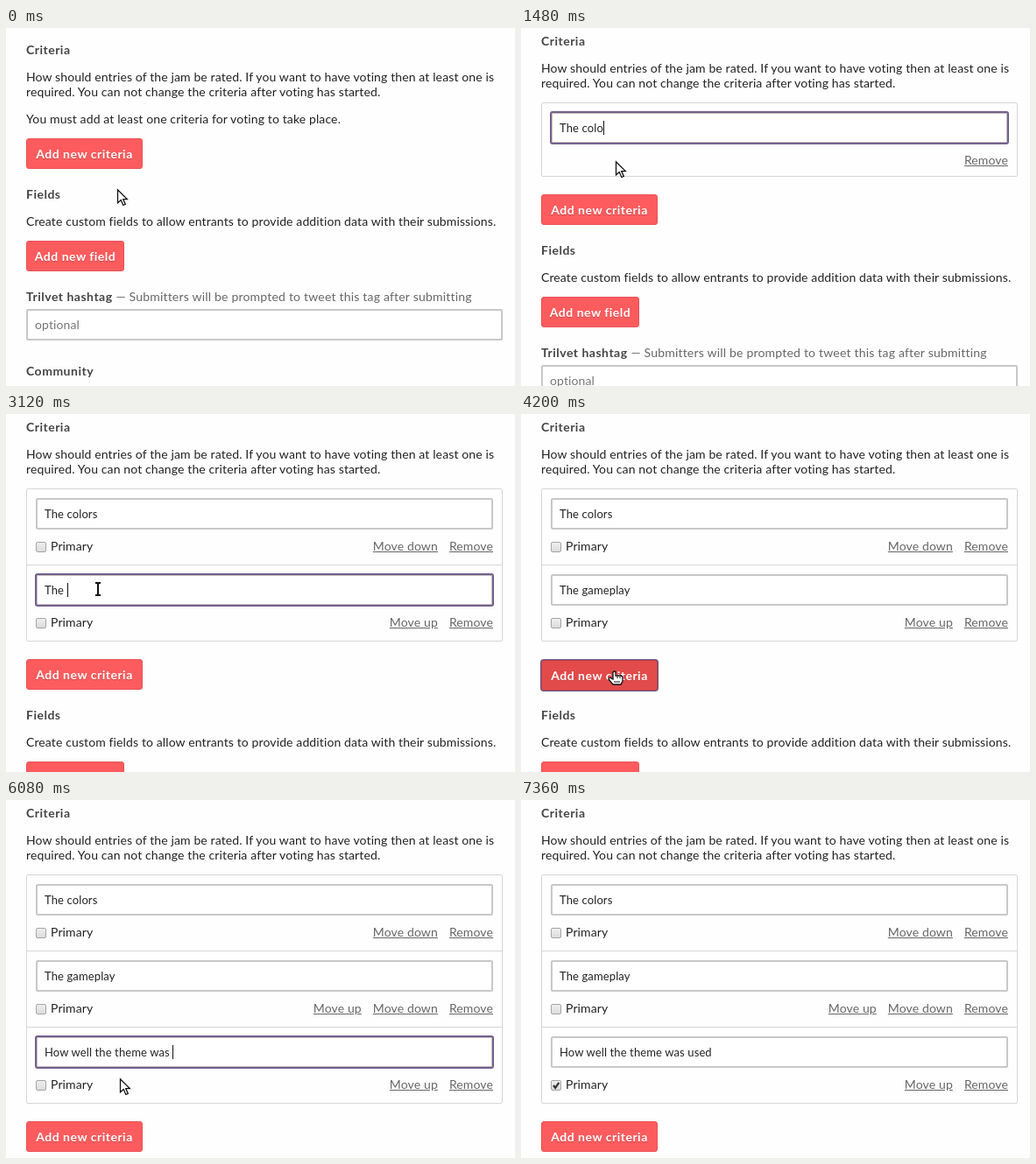
These frames come from a looping animation (581x409 px, 8300 ms). An HTML page:

```html
<!DOCTYPE html>
<html lang="en">
<head>
<meta charset="utf-8">
<title>Jam criteria form</title>
<style>
html, body { margin: 0; width: 100%; height: 100%; overflow: hidden; background: #fefefe; }
#stage { position: relative; width: 581px; height: 409px; overflow: hidden; font: 14px/17px Lato, sans-serif; letter-spacing: .12px; color: #222; }
#stage > * { position: absolute; box-sizing: border-box; white-space: pre; }
b, .button { letter-spacing: .5px; }
b { color: #444; }
.hint { color: #666; letter-spacing: .2px; }
.button { left: 23px; height: 35px; border: 1px solid #e95356; border-radius: 3px; background: #fc5c5e; color: #fff;
  font-weight: bold; line-height: 34px; text-align: center; text-shadow: 0 1px 0 #cf4647; }
.pressed { background: #e34a4a !important; border-color: #b8434c; box-shadow: 0 0 0 1px #67598c; }
.list { left: 23px; top: 85px; width: 544px; border: 1px solid #d6d6d6; border-radius: 2px; }
.line { left: 24px; width: 542px; height: 1px; background: #d6d6d6; }
.input { height: 36px; border: 2px solid #c8c8c8; border-radius: 2px; padding-left: 8px; line-height: 32px; background: #fff; }
.small { font-size: 13px; }
.focus { border-color: #c2bcb8; outline: 2px solid #75608f; outline-offset: -1px; }
.empty { color: #757575; }
.caret { display: inline-block; width: 1px; height: 16px; margin-right: -1px; background: #111; vertical-align: -3px; }
.links { right: 25px; display: flex; gap: 13px; color: #666; text-decoration: underline; }
.check { left: 34px; width: 12px; height: 12px; border: 1px solid #a5a5a5; border-radius: 2px; background: linear-gradient(#eee, #dcdcdc); }
svg { overflow: visible; }
</style>
</head>
<body>
<div id="stage"></div>
<script>
const LOOP = 8300;
const stage = document.getElementById('stage');

// added/blurred: when the row appears and loses focus; typing: [chars, start, end]
const rows = [
  { text: 'The colors', added: 240, blurred: 2060, caretOff: [700, 1000], typing: [[8, 1060, 1480], [2, 1640, 1700]] },
  { text: 'The gameplay', added: 2120, blurred: 4140, caretOff: [2500, 2920], typing: [[12, 2950, 3560]] },
  { text: 'How well the theme was used', added: 4260, blurred: 6940, caretOff: [4600, 4980], typing: [[18, 5020, 5800], [9, 5860, 6300]] }
];
const presses = [[180, 240], [2060, 2120], [4140, 4260]];
const hovers = [[100, 240], [2000, 2120], [4040, 4260]];
const checkedAt = 7000;

// time, x, y, shape until the next key
const pointer = [
  [0, 127, 184, 'arrow'], [20, 127, 184, 'arrow'], [100, 118, 160, 'hand'], [180, 107, 142, 'hand'],
  [240, 107, 142, 'arrow'], [540, 107, 142, 'arrow'], [760, 108, 152, 'arrow'],
  [1920, 108, 152, 'arrow'], [2000, 108, 191, 'hand'], [2060, 108, 210, 'hand'], [2120, 108, 212, 'arrow'],
  [2200, 107, 218, 'arrow'], [2320, 107, 222, 'arrow'], [2420, 106, 214, 'beam'], [2560, 105, 200, 'beam'],
  [3900, 105, 200, 'beam'], [3950, 105, 220, 'arrow'], [4040, 106, 281, 'hand'], [4120, 107, 294, 'hand'],
  [4260, 107, 294, 'beam'], [4360, 112, 306, 'arrow'], [4620, 130, 318, 'arrow'],
  [6620, 130, 318, 'arrow'], [6900, 38, 326, 'arrow'], [7200, 38, 326, 'arrow'], [7360, 62, 412, 'none'], [LOOP, 62, 412, 'none']
];
const shapes = {
  none: '',
  arrow: '<path d="M.5 .8V15.8L4.2 12.6L6.8 18.5L9.3 17.4L6.7 11.6H11.3Z" fill="#fff" stroke="#111" stroke-width="1.3"/>',
  beam: '<path d="M-3-7H3M-3 7H3M0-7V7" fill="none" stroke="#fff" stroke-width="4"/><path d="M-3-7H3M-3 7H3M0-7V7" fill="none" stroke="#111" stroke-width="2"/>',
  hand: '<path d="M-2 1Q0-1 1 1V5H7Q9 5 9 8V11L7 15H-2L-7 9Q-6 6-4 8L-2 9Z" fill="#fff" stroke="#111" stroke-width="1.3"/><path d="M3 6V8M6 6V8M-1 12H6" stroke="#111"/>'
};

const within = (t, [from, to]) => t >= from && t < to;
const clamp = v => Math.max(0, Math.min(1, v));
const box = (cls, style, html = '') => `<div class="${cls}" style="${style}">${html}</div>`;
const text = (y, html, x = 23) => box('', `left:${x}px;top:${y - 9}px`, html);

function typedCount(t, typing) {
  return typing.reduce((sum, [n, from, to]) =>
    sum + (t < from ? 0 : Math.min(n, 1 + Math.floor((t - from) / (to - from) * (n - 1) + 1e-6))), 0);
}

function hoverLevel(t) {
  return Math.max(...hovers.map(([from, to]) => Math.min(clamp((t - from) / 100), clamp(1 - (t - to) / 160))));
}

function button(y, label, width, style = '', cls = '') {
  return box('button ' + cls, `top:${y}px;width:${width}px;${style}`, label);
}

function rowView(row, i, count, t) {
  const y = 85 + 87 * i;
  const typed = row.text.slice(0, typedCount(t, row.typing));
  const focused = t < row.blurred;
  const caret = focused && !within(t, row.caretOff) ? '<i class="caret"></i>' : '';
  const content = typed ? typed + caret : `${caret}<span class="empty">How should the entry be judged?</span>`;
  const links = [i > 0 && 'Move up', i < count - 1 && 'Move down', 'Remove'].filter(Boolean);
  const tick = i === 2 && t >= checkedAt
    ? '<svg width="10" height="10" style="display:block"><path d="M2 5L4.2 7.8L8.3 1.8" fill="none" stroke="#333" stroke-width="2.2"/></svg>' : '';
  return (i ? box('line', `top:${y}px`) : '')
    + box('input small' + (focused ? ' focus' : ''), `left:34px;top:${y + 11}px;width:522px`, content)
    + (count > 1 ? box('check', `top:${y + 61}px`, tick) + text(y + 66, 'Primary', 51) : '')
    + box('links', `top:${y + 57}px`, links.map(link => `<span>${link}</span>`).join(''));
}

function pointerView(t) {
  const i = pointer.findIndex((key, k) => t < pointer[k + 1][0]);
  const [t0, x0, y0, shape] = pointer[i], [t1, x1, y1] = pointer[i + 1];
  const p = (t - t0) / (t1 - t0);
  const x = x0 + (x1 - x0) * p, y = y0 + (y1 - y0) * p;
  return `<svg width="1" height="1" style="left:${Math.round(x)}px;top:${Math.round(y)}px">${shapes[shape]}</svg>`;
}

function view(t) {
  const shown = rows.filter(row => t >= row.added);
  const count = shown.length;
  const top = count ? 15 : 25;
  const listEnd = count === 1 ? 170 : 86 + 87 * count;
  const y = count ? listEnd + 20 : 126;
  const pressed = presses.some(span => within(t, span));
  const lift = hoverLevel(t) * 24;
  const fill = `background:rgb(${252 + lift / 8},${92 + lift},${94 + lift})`;
  return text(top, '<b>Criteria</b>')
    + text(top + 31, 'How should entries of the jam be rated. If you want to have voting then at least one is\nrequired. You can not change the criteria after voting has started.')
    + (count ? box('list', `height:${listEnd - 85}px`) : text(104, 'You must add at least one criteria for voting to take place.'))
    + shown.map((row, i) => rowView(row, i, count, t)).join('')
    + button(y + pressed, 'Add new criteria', 133, fill, pressed ? 'pressed' : '')
    + text(y + 64, '<b>Fields</b>')
    + text(y + 95, 'Create custom fields to allow entrants to provide addition data with their submissions.')
    + button(y + 117, 'Add new field', 112)
    + text(y + 181, '<b>Trilvet hashtag</b><span class="hint"> — Submitters will be prompted to tweet this tag after submitting</span>')
    + box('input', `left:23px;top:${y + 195}px;width:544px`, '<span class="empty">optional</span>')
    + text(y + 266, '<b>Community</b>')
    + pointerView(t);
}

function draw() {
  stage.innerHTML = view(performance.now() % LOOP);
  requestAnimationFrame(draw);
}
draw();
</script>
</body>
</html>
```
